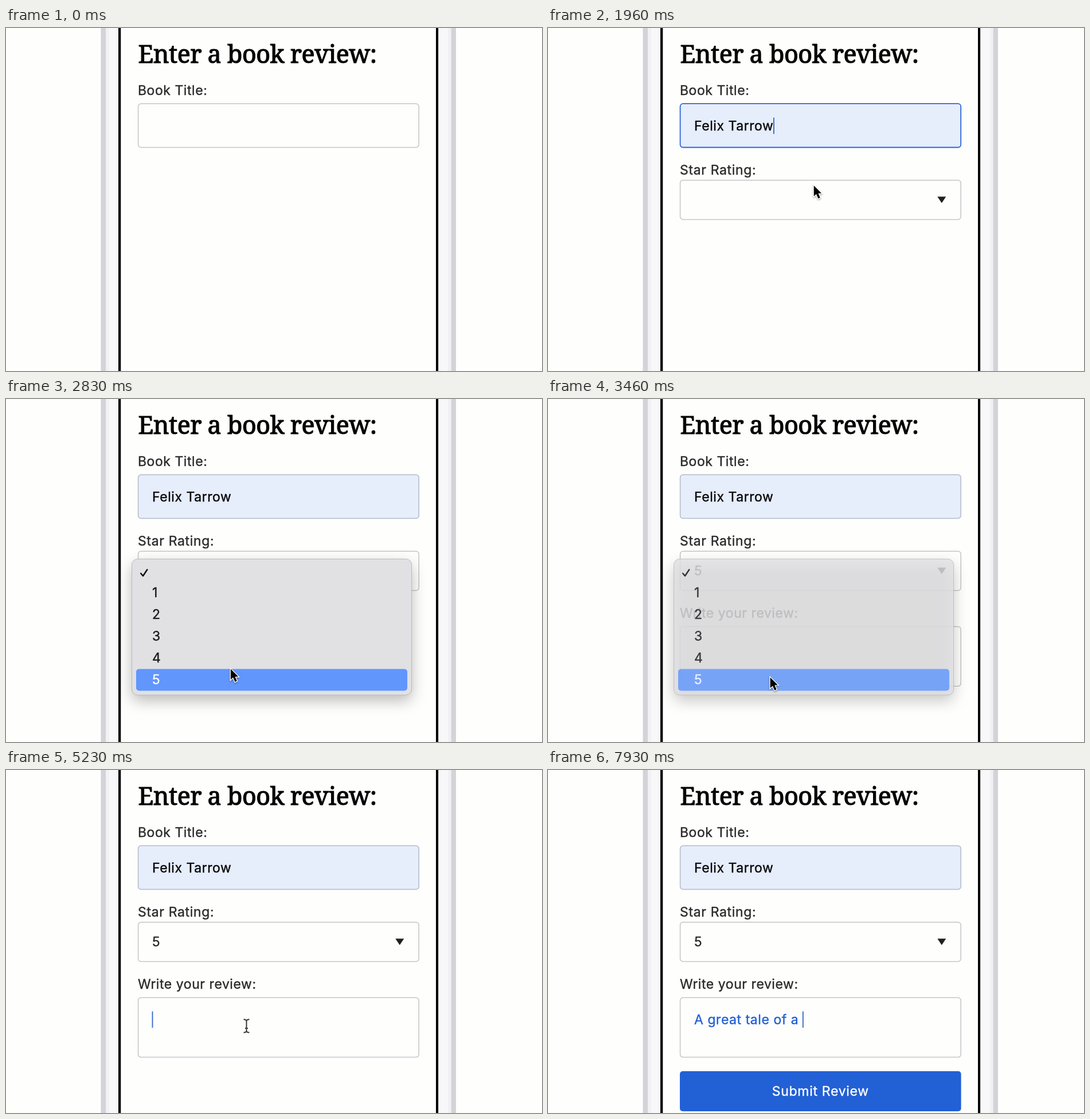
Recreate the animation shown at these times as an HTML page with a canvas. Size 935x599 px, loop 8 s.

```html
<!DOCTYPE html>
<html lang="en">
<head>
<meta charset="utf-8">
<title>Book review form</title>
<style>
html, body { margin: 0; width: 100%; height: 100%; overflow: hidden; background: #fefefd; }
canvas { display: block; width: 935px; height: 599px; }
</style>
</head>
<body>
<canvas id="stage"></canvas>
<script>
const W = 935, H = 599, LOOP = 8000;
const canvas = document.getElementById('stage');
const ctx = canvas.getContext('2d');
const dpr = window.devicePixelRatio || 1;
canvas.width = W * dpr;
canvas.height = H * dpr;

const SANS = 'Inter, Roboto, sans-serif';
const BODY = '23px ' + SANS;
const BLUE = '#2260d5', GREY = '#c5c5c6', INK = '#2a2a2b', PAPER = '#fefefd';
const BOOK = 'Felix Tarrow';
const REVIEW = 'A great tale of a ';
const KEYS = [5460, 5730, 5900, 6060, 6130, 6230, 6330, 6430, 6630, 6730,
  6860, 6960, 7060, 7200, 7300, 7430, 7800, 7930];

const clamp = v => Math.max(0, Math.min(1, v));
const ramp = (t, a, b) => clamp((t - a) / (b - a));
const linear = p => p;
const smooth = p => p * p * (3 - 2 * p);
const easeOut = p => 1 - (1 - p) * (1 - p);

// time, x, y, easing used to reach the point
const PATH = [
  [400, 917, 368, linear], [760, 544, 196, smooth], [1360, 544, 196, linear],
  [1430, 509, 212, linear], [1600, 464, 243, easeOut], [1830, 464, 243, linear],
  [2060, 462, 294, smooth], [2630, 462, 294, linear], [2730, 425, 398, linear],
  [2830, 391, 470, linear], [3030, 386, 482, easeOut], [3430, 386, 482, linear],
  [3700, 405, 558, smooth], [3760, 405, 558, linear], [4130, 419.5, 447, smooth]
];

function pointer(t) {
  const i = PATH.findIndex(k => k[0] > t);
  if (i < 0) return PATH[PATH.length - 1].slice(1, 3);
  const a = PATH[i - 1], b = PATH[i];
  const p = b[3](ramp(t, a[0], b[0]));
  return [a[1] + (b[1] - a[1]) * p, a[2] + (b[2] - a[2]) * p];
}

// weight is a thin outline that thickens the letters
function text(str, x, y, { color = INK, font = BODY, spacing = 0.55, align = 'left', weight = 0.4 } = {}) {
  ctx.font = font;
  ctx.letterSpacing = spacing + 'px';
  ctx.textAlign = align;
  ctx.fillStyle = ctx.strokeStyle = color;
  ctx.fillText(str, x, y);
  if (!weight) return;
  ctx.lineWidth = weight;
  ctx.lineJoin = 'round';
  ctx.strokeText(str, x, y);
}

function textWidth(str) {
  ctx.font = BODY;
  ctx.letterSpacing = '0.55px';
  return ctx.measureText(str).width;
}

function box(x, y, w, h, r, fill, stroke, line = 1.5) {
  ctx.beginPath();
  ctx.roundRect(x, y, w, h, r);
  if (fill) { ctx.fillStyle = fill; ctx.fill(); }
  if (stroke) { ctx.strokeStyle = stroke; ctx.lineWidth = line; ctx.stroke(); }
}

function bar(x, w, color) {
  ctx.fillStyle = color;
  ctx.fillRect(x, 0, w, H);
}

function shadow(color, blur, dy) {
  ctx.shadowColor = color;
  ctx.shadowBlur = blur * dpr;
  ctx.shadowOffsetY = dy * dpr;
}

function noShadow() { shadow('transparent', 0, 0); }

function poly(points, close) {
  ctx.beginPath();
  points.forEach(([x, y]) => ctx.lineTo(x, y));
  if (close) ctx.closePath();
}

function caret(x, y) {
  ctx.fillStyle = '#2f67c6';
  ctx.fillRect(x - 0.4, y, 1.8, 28.5);
}

function drawPhone() {
  bar(0, W, PAPER);
  bar(165.5, 8.5, '#d3d3d8');
  bar(174, 6, '#f1f1f4');
  bar(180, 16, '#f8f8fa');
  bar(196, 4.3, '#000');
  bar(750, 4.3, '#000');
  bar(754.3, 16.7, '#f8f8fa');
  bar(771, 5.5, '#f1f1f4');
  bar(776.5, 8.5, '#d3d3d8');
  text('Enter a book review:', 230.5, 60.5,
    { color: '#050505', font: '500 43px "Noto Serif", serif', spacing: -0.5, weight: 1.2 });
}

function drawTitleField(t) {
  const filled = t >= 1500, focused = t >= 930 && t < 2200;
  text('Book Title:', 230, 117);
  box(230.6, 132.2, 489.6, 76.3, 5, filled ? '#e6edfb' : PAPER,
    focused ? '#2b66d4' : filled ? '#b3bac8' : GREY, focused ? 1.8 : 1.5);
  if (filled) text(BOOK, 255, 179, { color: '#080808' });
  if (t >= 930 && t < 1430) caret(255, 156.5);
  if (t >= 1830 && t < 2200) caret(255 + textWidth(BOOK), 156.5);
}

function drawSuggestions(t) {
  if (t < 930 || t >= 1830) return;
  shadow('rgba(0,0,0,0.38)', 4, 1.5);
  box(230, 210, 490.5, 129.5, [0, 0, 6, 6], '#fff');
  noShadow();
  if (t >= 1500) {
    ctx.fillStyle = '#ececed';
    ctx.fillRect(230, 223, 490.5, 52);
  }
  const style = { color: '#202124', font: '500 19px ' + SANS, spacing: 0, weight: 0 };
  text(BOOK, 247.5, 256, style);
  text('test', 247.5, 309, style);
}

function drawRating(t) {
  if (t < 1830) return;
  text('Star Rating:', 230, 256, { spacing: 0.65 });
  box(230.6, 265.7, 489.6, 68.8, 5, PAPER, GREY);
  if (t >= 3400) text('5', 255, 308);
  poly([[679.3, 294.5], [694.3, 294.5], [686.8, 305.7]], true);
  ctx.fillStyle = '#202020';
  ctx.fill();
}

function drawMenu(t, y) {
  if (t < 2200 || t >= 3600) return;
  ctx.save();
  ctx.globalAlpha = (0.6 + 0.4 * ramp(t, 2200, 2300)) * (1 - ramp(t, 3430, 3600));
  shadow('rgba(0,0,0,0.27)', 26, 10);
  box(219.6, 279.4, 488, 237.6, 10, '#e1e1e3');
  noShadow();
  box(219.6, 279.4, 488, 237.6, 10, null, '#b9b9bb', 1);
  const active = t < 2630 ? 0 : Math.max(0, Math.min(5, Math.floor((y - 281.5) / 38)));
  const flash = t >= 3330 && t < 3390;
  if (active === 0 && t < 2660) box(227, 287, 473, 32, 5, '#c1c1c2');
  else if (active > 0 && !flash) box(227, 281.5 + 38 * active, 473, 38, 5, '#6196fd');
  poly([[235.2, 304.5], [239, 309], [246.3, 298]]);
  ctx.strokeStyle = '#0c0c0c';
  ctx.lineWidth = 2.4;
  ctx.lineCap = ctx.lineJoin = 'round';
  ctx.stroke();
  for (let n = 1; n <= 5; n++) {
    const lit = n === active && !flash;
    text(String(n), 255, 308 + 38 * n, { color: lit ? '#fff' : '#1b1b1c', spacing: 0 });
  }
  ctx.restore();
}

function drawReview(t) {
  if (t < 3400) return;
  text('Write your review:', 230, 382);
  box(230.6, 397.6, 489.6, 104, 5, PAPER, GREY);
  const typed = REVIEW.slice(0, KEYS.filter(k => k <= t).length);
  text(typed, 255, 444, { color: BLUE });
  if (t >= 4230 && (t < 4730 || t >= 5230)) caret(255 + textWidth(typed), 421.5);
  if (t >= 5460) {
    ctx.globalAlpha = t < 5530 ? 0.6 : 1;
    box(230, 526, 490.6, 70, 5, BLUE);
    text('Submit Review', 475.3, 569, { color: '#fff', spacing: 0.7, align: 'center' });
    ctx.globalAlpha = 1;
  }
}

function drawArrow() {
  poly([[0, 0], [0, 18.5], [4.2, 14.7], [7.6, 22.4], [10.9, 21], [7.6, 13.5], [13.2, 13.2]], true);
  shadow('rgba(0,0,0,0.35)', 3, 1.5);
  ctx.lineJoin = 'miter';
  ctx.strokeStyle = '#fff';
  ctx.lineWidth = 2.6;
  ctx.stroke();
  noShadow();
  ctx.fillStyle = '#000';
  ctx.fill();
}

function drawBeam() {
  ctx.beginPath();
  for (const s of [-1, 1]) {
    ctx.moveTo(-5, 11.5 * s);
    ctx.quadraticCurveTo(0, 11.5 * s, 0, 8 * s);
    ctx.quadraticCurveTo(0, 11.5 * s, 5, 11.5 * s);
  }
  ctx.moveTo(0, -9);
  ctx.lineTo(0, 9);
  ctx.moveTo(-2.5, 4);
  ctx.lineTo(2.5, 4);
  ctx.lineCap = 'butt';
  for (const [color, width] of [['rgba(255,255,255,0.9)', 4], ['#3a3a3a', 2]]) {
    ctx.strokeStyle = color;
    ctx.lineWidth = width;
    ctx.stroke();
  }
}

function drawPointer(t, [x, y]) {
  if (t < 400 || t >= 5460) return;
  const inTitle = t < 1830 && x > 230 && x < 720 && y > 132 && y < 209;
  const inReview = t >= 3600 && y > 398 && y < 502;
  ctx.save();
  ctx.translate(x, y);
  if (inTitle || inReview) drawBeam();
  else {
    ctx.translate(1, 1.5);
    drawArrow();
  }
  ctx.restore();
}

function draw(t) {
  ctx.setTransform(dpr, 0, 0, dpr, 0, 0);
  const pos = t < 400 ? [0, 0] : pointer(t);
  drawPhone();
  drawTitleField(t);
  drawSuggestions(t);
  drawRating(t);
  drawReview(t);
  drawMenu(t, pos[1] + 2);
  drawPointer(t, pos);
}

const start = performance.now();
function tick() {
  draw((performance.now() - start) % LOOP);
  requestAnimationFrame(tick);
}
tick();
</script>
</body>
</html>
```
